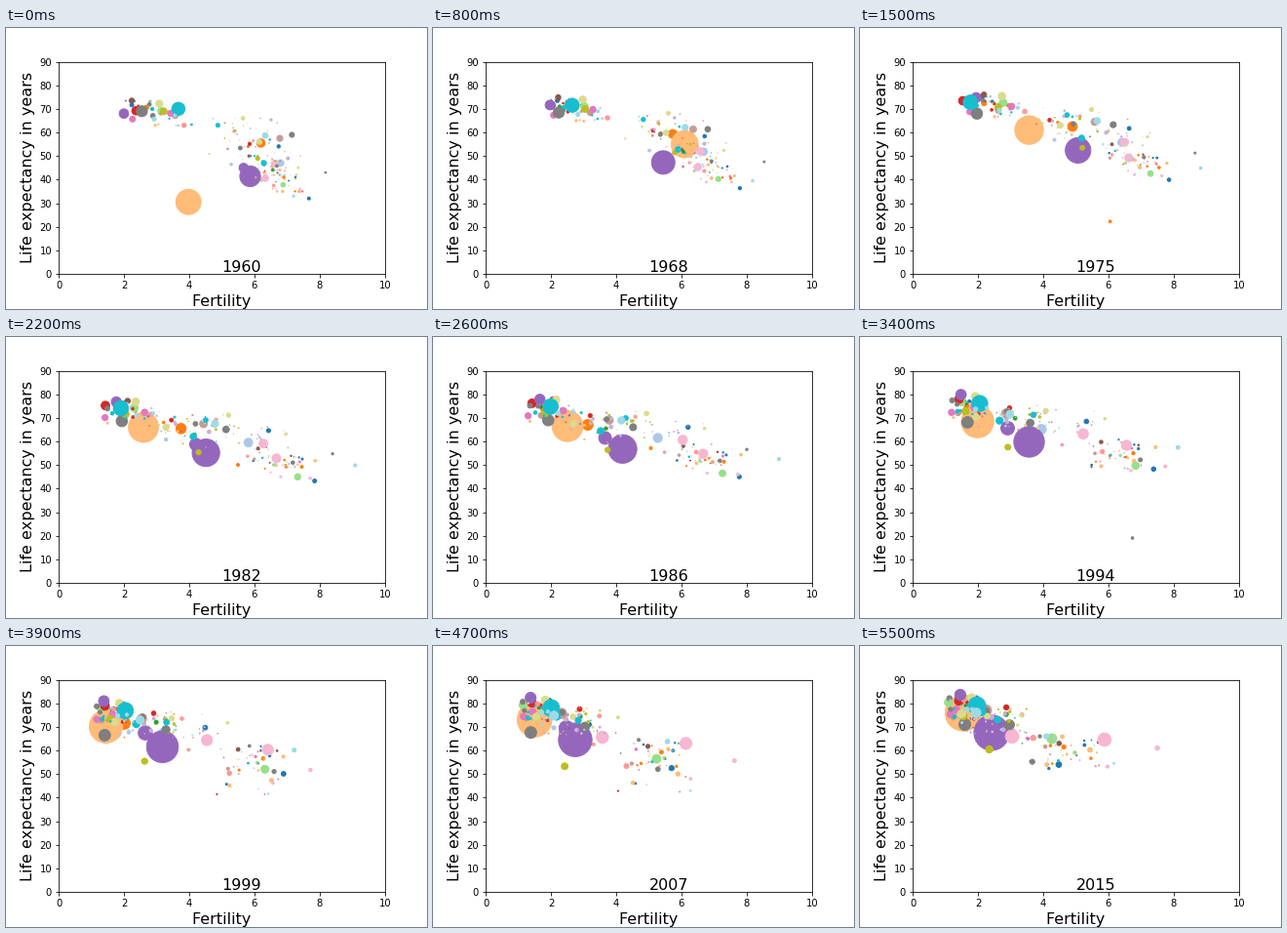
These frames come from a looping animation (432 by 288 pixels, 5.6 s). A matplotlib script:

```python
import numpy as np
import matplotlib.pyplot as plt
from matplotlib.animation import FuncAnimation

START, YEARS = 1960, 56
t = np.arange(YEARS)
u = t / t[-1]
rng = np.random.default_rng(7)
COLORS = plt.get_cmap("tab20").colors
KEYS = [0, 15, 30, 42, 55]
plt.rcParams["text.kerning_factor"] = 6

# Each country: (colour index, fertility, life expectancy, millions of people)
countries = []


def path(hue, p0, p1, fert, life, keys=KEYS):
    """Country that moves through a few key points."""
    countries.append((hue, np.interp(t, keys, fert), np.interp(t, keys, life),
                      p0 + (p1 - p0) * u))


def slide(mid, width):
    """S-curve from 0 to 1 over the years, steepest at mid."""
    s = 1 / (1 + np.exp((mid - t) / width))
    return (s - s[0]) / (s[-1] - s[0])


def drift(hue, p0, p1, x0, x1, mid, y0, y1, width=7, bend=1.4, bulge=0,
          dip=(0, 0, 1)):
    """Country that eases from one state to another.

    bulge lifts fertility half-way; dip is a (depth, year, width) crisis.
    """
    fert = x0 + (x1 - x0) * slide(mid, width) + bulge * np.sin(np.pi * u)
    life = y0 + (y1 - y0) * (1 - (1 - u) ** bend)
    depth, when, span = dip
    life = life - depth * np.exp(-((t - when) / span) ** 2)
    countries.append((hue, fert, life, p0 * (p1 / p0) ** u))


def small(n, top, growth, x0, x1, mid, y0, y1, bend=1.5, bulge=0, crisis=0):
    """Spread n minor countries around a common development."""
    for rank in range(n):
        pop = 0.05 + top * np.exp(-rank / 8)
        k = rng.beta(1.8, 1.8)
        poor = np.clip(k + rng.normal(0, 0.3), 0, 1)
        drift(rng.integers(20), pop, pop * growth,
              x0[0] + (x0[1] - x0[0]) * k, rng.uniform(*x1),
              rng.uniform(*mid), y0[1] - (y0[1] - y0[0]) * poor,
              rng.uniform(*y1), width=rng.uniform(5, 9), bend=bend,
              bulge=bulge * rng.random(),
              dip=(crisis * rng.random() ** 3, 43, 8))


# The giants
path(3, 667, 1371, [3.98, 7.2, 6.1, 3.57, 2.6, 2.42, 1.45, 1.55],
     [30.5, 51, 55, 61, 66, 67, 70.2, 75.9], [0, 3, 8, 15, 22, 30, 39, 55])
path(8, 450, 1309, [5.87, 5.07, 3.88, 2.95, 2.42], [41.4, 52.4, 58.4, 62.6, 67.5])
path(18, 181, 321, [3.67, 1.77, 2.07, 2.03, 1.97], [70, 72.8, 75.5, 77.3, 79])
path(14, 125, 146, [2.55, 1.97, 1.9, 1.25, 1.6], [69, 68, 69.4, 65.5, 71])
path(8, 93, 127, [2.0, 1.95, 1.56, 1.33, 1.46], [68, 74.8, 79, 81.6, 83.6])
path(8, 88, 258, [5.67, 5.15, 3.12, 2.5, 2.44], [45, 54, 64.2, 68.5, 71])

# Other large countries
drift(2, 72, 206, 6.2, 1.75, 20, 55.5, 75)
drift(13, 45, 189, 6.62, 3.05, 38, 46.8, 66, bend=2)
drift(13, 45, 182, 6.33, 5.88, 40, 40.6, 64.6, bulge=0.4)
drift(1, 48, 161, 6.8, 2.2, 31, 47, 71.5)
drift(11, 38, 127, 6.78, 2.25, 21, 57.5, 77)
drift(6, 73, 82, 2.37, 1.42, 9, 69.2, 81, width=3)
drift(19, 33, 93, 6.33, 1.95, 26, 58.7, 76)
drift(18, 27, 79, 6.29, 2.1, 21, 47, 76.5)
drift(5, 22, 100, 6.88, 4.27, 44, 37.8, 65, bend=0.6, bulge=0.6)
drift(17, 27, 69, 6.15, 1.5, 18, 56, 75.5)
drift(14, 26, 101, 7.15, 2.97, 22, 59, 70.9)
drift(16, 17, 55, 6.1, 2.35, 22, 49, 61.5, dip=(8, 45, 7))

# Outliers and sudden crises
drift(14, 3, 11, 8.18, 3.9, 33, 43, 66, bulge=1, dip=(41, 34, 1.2))
drift(2, 6, 15, 6.9, 2.7, 34, 41, 68.5, bulge=-0.8, dip=(33, 16.5, 4))
drift(19, 5, 27, 7.2, 4.1, 38, 33, 66, bulge=2.3)
drift(0, 9, 33, 7.67, 4.48, 47, 32, 54, bulge=0.3)
drift(13, 3, 20, 7.4, 7.5, 30, 36, 61, bend=0.8, bulge=0.3)
drift(7, 4, 11, 6.3, 3.0, 34, 43, 64, dip=(30, 50, 0.5))

# Early industrial, fast changing and late changing countries
small(38, 58, 1.25, (1.95, 4.1), (1.1, 2.0), (7, 28), (63, 73.5), (72, 82.5),
      bend=1.2)
small(66, 16, 2.8, (4.5, 7.6), (1.5, 3.5), (10, 40), (42, 66), (67, 80),
      bend=1.8)
small(44, 8, 3.6, (5.7, 7.5), (3.3, 6.2), (32, 50), (35, 50), (53, 67),
      bulge=0.6, crisis=18)

countries.sort(key=lambda c: c[0])
hues = [COLORS[c[0]] for c in countries]
fert, life, pop = (np.array([c[i] for c in countries]) for i in (1, 2, 3))

fig = plt.figure(figsize=(6, 4), dpi=72)
ax = fig.add_axes([0.125, 0.125, 0.775, 0.755])
ax.set_xlim(0, 10)
ax.set_ylim(0, 90)
ax.set_xticks(range(0, 11, 2))
ax.set_yticks(range(0, 91, 10))
ax.set_xlabel("Fertility", fontsize=16)
ax.set_ylabel("Life expectancy in years", fontsize=16)

dots = ax.scatter(fert[:, 0], life[:, 0], s=pop[:, 0], c=hues)
year = ax.text(5, 1, str(START), fontsize=16)


def draw(i):
    dots.set_offsets(np.column_stack([fert[:, i], life[:, i]]))
    dots.set_sizes(pop[:, i])
    year.set_text(str(START + i))
    return dots, year


anim = FuncAnimation(fig, draw, frames=YEARS, interval=100, repeat=True,
                     repeat_delay=0)
plt.show()
```
